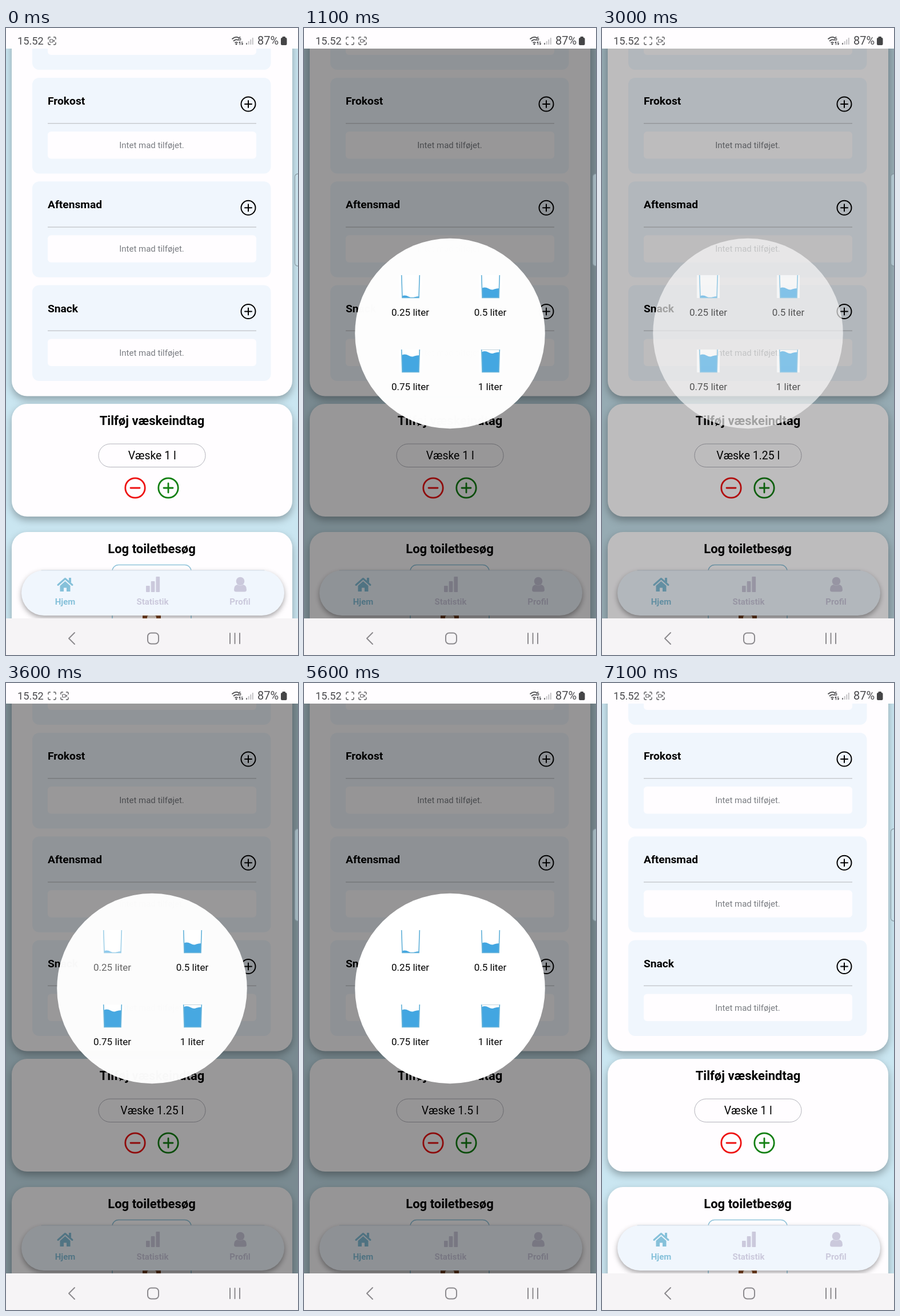
An HTML page that plays this animation: 511x1096 px, repeating every 7.3 s.

```html
<!DOCTYPE html>
<html lang="da">
<head>
<meta charset="utf-8">
<style>
  html, body { margin: 0; width: 100%; height: 100%; overflow: hidden; background: #cae6f1; }
  svg { display: block; width: 100vw; height: 100vh; font-family: Roboto, sans-serif; }
  .mid { text-anchor: middle; }
  .bold { font-weight: 700; }
  .card { fill: #fffdff; filter: drop-shadow(0 6px 7px rgba(0, 0, 0, .3)); }
  .line { fill: none; stroke-linecap: round; stroke-linejoin: round; }
</style>
</head>
<body>
<svg id="stage" viewBox="0 0 511 1096" preserveAspectRatio="none"></svg>
<script>
const LOOP = 7300;
const FADE = 300;
// Each dialog visit: fade-in start, fade-out start, tapped glass, volume afterwards
const visits = [
  { open: 825, close: 1800, glass: 0, volume: '1.25' },
  { open: 2825, close: 3570, glass: 0, volume: '1.5' },
  { open: 4525, close: 5770, glass: 1, volume: '1' }
];
const glasses = [
  { x: 186, y: 432, level: 37, label: '0.25 liter' },
  { x: 326, y: 432, level: 23, label: '0.5 liter' },
  { x: 186, y: 562, level: 10, label: '0.75 liter' },
  { x: 326, y: 562, level: 4.5, label: '1 liter' }
];

const text = (x, y, size, str, cls = '', fill = '#000', id = '') =>
  `<text x="${x}" y="${y}" font-size="${size}" class="${cls}" fill="${fill}" id="${id}">${str}</text>`;
const box = (x, y, w, h, r, fill, more = '') =>
  `<rect x="${x}" y="${y}" width="${w}" height="${h}" rx="${r}" fill="${fill}" ${more}/>`;
const line = (d, color, width = 2) =>
  `<path class="line" d="${d}" stroke="${color}" stroke-width="${width}"/>`;

function roundButton(x, y, r, arm, color, width, plus) {
  const d = `M${x - arm} ${y}h${2 * arm}` + (plus ? `M${x} ${y - arm}v${2 * arm}` : '');
  return `<circle cx="${x}" cy="${y}" r="${r}" fill="none" stroke="${color}" stroke-width="${width}"/>` +
    line(d, color, width);
}

function meal(y, title) {
  return box(46, y, 417.5, 167.5, 12, '#f0f6fd') +
    text(73, y + 47, 19.2, title, 'bold') +
    roundButton(424, y + 46, 12.5, 6, '#000', 2, true) +
    box(73, y + 79, 365, 1.5, 0, '#c8cbcf') +
    box(73, y + 94, 365, 47.5, 6, '#fffdff') +
    text(255, y + 123, 15, 'Intet mad tilføjet.', 'mid', '#7a7d82');
}

function recorder(id, x) {
  return `<g id="${id}" transform="translate(${x} 22.5)">` +
    line('M-6.5-3v-2q0-1.5 1.5-1.5h2M3-6.5h2q1.5 0 1.5 1.5v2M6.5 3v2q0 1.5-1.5 1.5h-2M-3 6.5h-2q-1.5 0-1.5-1.5v-2', '#58585b', 1.4) +
    `<g class="lens">${box(-3.7, -2.5, 5.2, 5, 1, 'none', 'stroke="#58585b" stroke-width="1.2"')}` +
    `<path d="M2 0l2.5-2v4z" fill="#58585b"/></g></g>`;
}

function statusBar() {
  const bars = [0, 1, 2, 3].map(i =>
    box(420 + i * 3.6, 26 - i * 3, 2, 3 + i * 3, .5, i ? '#c4c3c6' : '#77777a')).join('');
  return box(0, 0, 511, 36, 0, '#fffdff') +
    text(20, 29, 18.2, '15.52', '', '#4a4a4d') +
    recorder('rec', 80.5) + recorder('cam', 80.5) +
    line('M396 19q6-5 11-2M398.5 22.5q4-3.500 8-1.500M401 25.500q2-1.500 4 0', '#4a4a4d', 1.7) +
    '<circle cx="403" cy="28" r="1.500" fill="#4a4a4d"/>' +
    text(406.5, 22, 9, '6', 'bold', '#4a4a4d') +
    line('M409.500 29v-5l-1.500 1.500M413 24v5l1.500-1.500', '#4a4a4d', 1.3) + bars +
    text(440, 29, 20, '87%', '', '#4a4a4d') +
    box(481, 17, 10.5, 13, 2, '#454547') + box(483.5, 15, 5.5, 3, 1, '#454547');
}

function tabBar() {
  const on = '#86c1da', off = '#cbc9dc';
  return box(27, 948, 460, 79, 39.5, '#f0f6fd', 'style="filter:drop-shadow(0 4px 5px rgba(0,0,0,.35))"') +
    line('M62 948H452', '#d3dee7', 1.2) +
    line('M91 973.500L103.500 962.500L116 973.500', on, 3) + box(110, 961, 4, 8, .5, on) +
    `<path d="M94.500 975L103.500 967L112.500 975V985H106V978.500H101V985H94.500z" fill="${on}"/>` +
    [0, 1, 2].map(i => box(245 + i * 8.7, 975 - i * 8, 6.7, 11 + i * 8, 1, off)).join('') +
    `<circle cx="410" cy="967" r="7.300" fill="${off}"/>` +
    `<path d="M399 982q0-8 6-9q5 3 10 0q6 1 6 9q0 3.500-4 3.500h-14q-4 0-4-3.500z" fill="${off}"/>` +
    text(103.5, 1008, 15, 'Hjem', 'mid bold', on) +
    text(256.5, 1008, 15, 'Statistik', 'mid bold', off) +
    text(409.5, 1008, 15, 'Profil', 'mid bold', off);
}

function glass({ x, y, level, label }) {
  const rim = level < 5 ? line('M-14 .5H14', '#c3d3dc', 1) : '';
  return `<g class="fade" transform="translate(${x} ${y})">${box(-20, 0, 40, 40, 0, '#fff')}</g>` +
    `<g class="glass"><g transform="translate(${x + .5} ${y})">` +
    `<path d="M-15.500 ${level}q6-3 12 .5t10 1q4-1.500 9-1.500L14.500 40H-14.500z" fill="#42a6e1"/>` +
    `<path d="M-15.800 0L-14.500 39.500H14.500L15.800 0" fill="none" stroke="#68b4da" stroke-width="1.700"/>${rim}</g>` +
    text(x, y + 71, 17, label, 'mid') + '</g>';
}

const page =
  box(0, 0, 511, 1096, 0, '#cae6f1') +
  box(10, -60, 491, 703.5, 27, '', 'class="card"') +
  box(46, -60, 417.5, 133, 12, '#f0f6fd') + box(73, 0, 365, 47, 6, '#fffdff') +
  meal(87, 'Frokost') + meal(268.3, 'Aftensmad') + meal(449.5, 'Snack') +
  box(10, 657, 491, 197, 27, '', 'class="card"') +
  text(255.5, 694, 22, 'Tilføj væskeindtag', 'mid bold') +
  box(162, 727, 187, 40.5, 20.2, '#fffdff', 'stroke="#b2b2ba"') +
  text(255.7, 754, 19.4, '', 'mid', '#000', 'volume') +
  roundButton(226, 804, 17.2, 8, '#ee1111', 2.8, false) +
  roundButton(284, 804, 17.2, 8, '#128012', 2.8, true) +
  box(10, 881, 491, 230, 27, '', 'class="card"') +
  text(255, 918, 22, 'Log toiletbesøg', 'mid bold') +
  box(186, 938.5, 138, 130, 11, '#fffdff', 'stroke="#8fc3da" stroke-width="1.500"') +
  box(239, 1014, 32, 30, 8, '#7b4524') + box(247, 1027, 16, 10, 3, '#eadfd6') +
  tabBar();

const dialog =
  '<rect id="dim" y="36" width="511" height="996"/>' +
  '<circle class="fade" cx="255.500" cy="534" r="166.300" fill="#fff"/>' +
  glasses.map(glass).join('');

const system =
  box(505.5, 255, 14, 161, 5, 'rgba(205,228,237,.5)', 'stroke="rgba(130,147,155,.8)" stroke-width="1.300"') +
  statusBar() +
  box(0, 1032, 511, 64, 0, '#f6f4f6') +
  line('M120 1057L110 1067L120 1077', '#8c8a8e') +
  box(248, 1057.5, 19, 19, 6, 'none', 'stroke="#8c8a8e" stroke-width="2"') +
  line('M392 1058V1076M400.500 1058V1076M409 1058V1076', '#8c8a8e');

stage.innerHTML = page + dialog + system;

const $ = id => document.getElementById(id);
const fading = document.querySelectorAll('.fade');
const items = document.querySelectorAll('.glass');
const lens = document.querySelector('#rec .lens');
const clamp = x => Math.min(1, Math.max(0, x));
const ease = x => (1 - Math.cos(Math.PI * clamp(x))) / 2;

// Touch feedback: quick dip, slower recovery
function touch(t) {
  return t < 0 ? 1 - .6 * clamp((t + 60) / 60) : .4 + .6 * clamp(t / 200);
}

function draw(t) {
  let shown = 0, volume = '1', tap = null;
  for (const v of visits) {
    if (t >= v.open) {
      tap = v;
      shown = ease((t - v.open) / FADE) * (1 - ease((t - v.close) / FADE));
    }
    if (t >= v.close + 100) volume = v.volume;
  }
  $('volume').textContent = `Væske ${volume} l`;
  $('dim').setAttribute('opacity', shown * .41);
  fading.forEach(el => el.setAttribute('opacity', shown));
  items.forEach((el, i) => {
    const press = tap && tap.glass === i ? touch(t - tap.close + 40) : 1;
    el.setAttribute('opacity', shown * press);
  });

  const slide = ease((t - 60) / 260);
  $('rec').setAttribute('opacity', slide);
  $('cam').setAttribute('transform', `translate(${80.5 + 22 * slide} 22.5)`);
  const hidden = (t + (t < 2400 ? 300 : 400)) % 1000 < 500;
  lens.setAttribute('opacity', hidden ? 0 : 1);
}

const start = performance.now();
function tick() {
  draw((performance.now() - start) % LOOP);
  requestAnimationFrame(tick);
}
draw(0);
requestAnimationFrame(tick);
</script>
</body>
</html>
```
